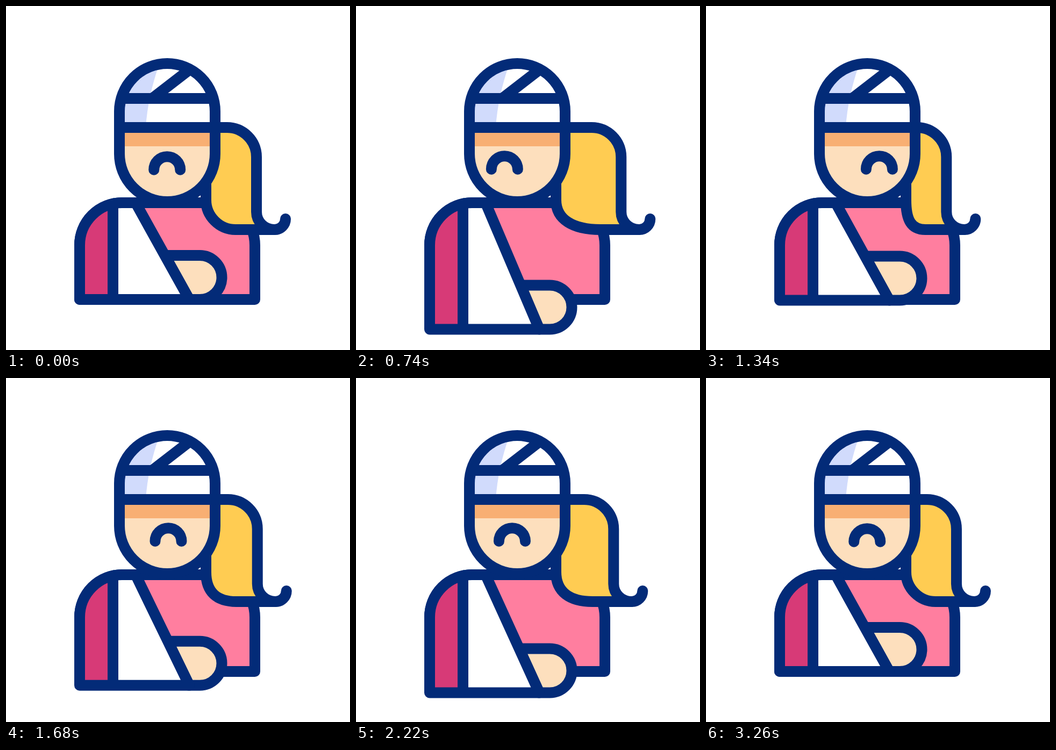
Animation, 640 px wide and 640 px high, one loop 3.62 s. Source, as an HTML page:

```html
<!DOCTYPE html>
<html lang="en">
<head>
<meta charset="utf-8">
<title>Injured patient</title>
<style>
  html, body { margin: 0; height: 100%; overflow: hidden; background: #fff; }
  svg { display: block; width: 100%; height: 100%; }
  .line { stroke: #032b78; stroke-width: 20; stroke-linecap: round; stroke-linejoin: round; }
</style>
</head>
<body>
<svg viewBox="0 0 640 640">
  <defs>
    <path id="skull" d="M211 196a89 89 0 0 1 178 0V275a89 89 0 0 1-178 0Z"/>
    <clipPath id="inHead"><use href="#skull"/></clipPath>
  </defs>

  <path class="line" fill="#ff7e9f" d="M137 546V445A79 79 0 0 1 216 366H384A79 79 0 0 1 463 445V546Z"/>

  <path id="hand" class="line" fill="#fddfbd"/>
  <path id="sleeve" fill="#d73a77"/>
  <path id="sling" fill="#fff"/>
  <path id="armLines" class="line" fill="none"/>

  <path id="hair" class="line" fill="#ffcc52"/>
  <path id="tail" class="line" fill="none"/>

  <g clip-path="url(#inHead)">
    <path fill="#fff" d="M200 100H400V226H200Z"/>
    <path fill="#d1dbfc" d="M200 100H288Q264 165 260 226H200Z"/>
    <path fill="#fddfbd" d="M200 226H400V370H200Z"/>
    <path fill="#f8af73" d="M200 226H400V261H200Z"/>
  </g>
  <use href="#skull" class="line" fill="none"/>
  <path class="line" fill="none" d="M211 226H389M215 172H385M272 172L338 121"/>
  <path id="mouth" class="line" fill="none" d="M275.2 304.7a24.5 24.5 0 0 1 49 0"/>
</svg>
<script>
const LOOP = 3620;
const times = [200, 800, 1400, 2000, 2600, 3280];
const tracks = {
  arm:   [0, 57, 0, 57, 0, 0],
  mouth: [0, -24, 24, -24, 24, 0],
  hair:  [0, 28, -20, 28, -20, 0],
  tense: [0, 1, 1, 1, 1, 0]
};

const set = (id, name, value) => document.getElementById(id).setAttribute(name, value);

function valueAt(keys, t) {
  if (t <= times[0]) return keys[0];
  const i = times.findIndex(end => t < end);
  if (i < 0) return keys[keys.length - 1];
  const x = (t - times[i - 1]) / (times[i] - times[i - 1]);
  return keys[i - 1] + (keys[i] - keys[i - 1]) * x * x * (3 - 2 * x);
}

function drawArm(drop) {
  const bottom = 546 + drop, top = 464 + drop;
  const wrist = 241 + 100 * (top - 366) / (bottom - 366);
  const shoulder = `M137 ${bottom}V445A79 79 0 0 1 216 366`;
  set('hand', 'd', `M${wrist} ${top}H360.5a41 41 0 0 1 0 82H341Z`);
  set('sleeve', 'd', `${shoulder}V${bottom}Z`);
  set('sling', 'd', `M199 366H241L341 ${bottom}H199Z`);
  set('armLines', 'd', `${shoulder}H241L341 ${bottom}H137M199 368V${bottom}`);
}

function drawHair(shift, tense) {
  const x = n => n + shift;
  set('hair', 'd', `M372 226H${x(411)}a55 55 0 0 1 55 55V383a33 33 0 0 0 33 33H${x(427)}` +
    `C${397 - 6 * tense + shift / 2} 416 372 ${391 + 7 * tense} 372 361Z`);
  set('tail', 'd', `M${x(499)} 416h1a20 20 0 0 0 20-20`);
}

function draw(now) {
  const t = now % LOOP;
  const pose = {};
  for (const name in tracks) pose[name] = valueAt(tracks[name], t);
  drawArm(pose.arm);
  drawHair(pose.hair, pose.tense);
  set('mouth', 'transform', `translate(${pose.mouth} ${-pose.tense})`);
}

const start = performance.now();
function tick() {
  draw(performance.now() - start);
  requestAnimationFrame(tick);
}
tick();
</script>
</body>
</html>
```
